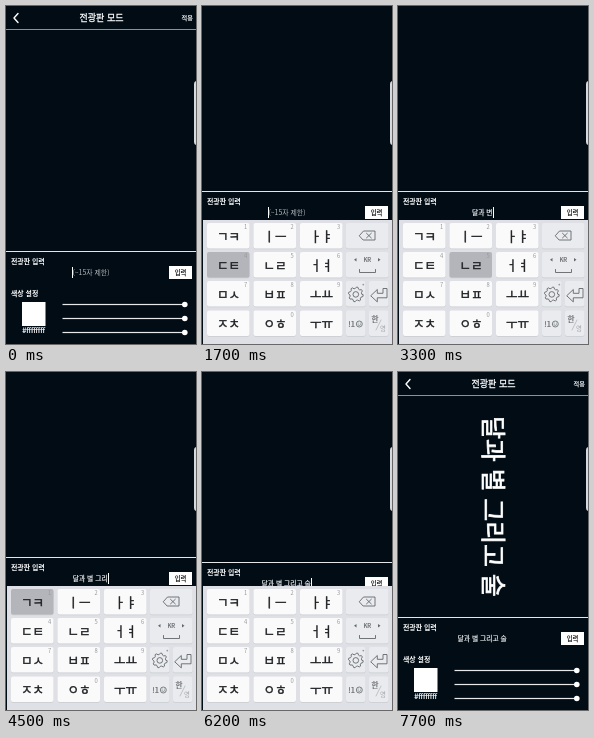
These frames come from a looping animation (190x338 px, 8 s). An HTML page:

```html
<!DOCTYPE html>
<html lang="ko">
<head>
<meta charset="utf-8">
<title>전광판 모드</title>
<style>
  html, body { margin: 0; width: 100%; height: 100%; overflow: hidden; background: #010c15; }
  svg { display: block; width: 100vw; height: 100vh; }
  text { font-family: 'Noto Sans CJK KR', 'Noto Sans CJK', 'Noto Sans CJK JP', sans-serif; white-space: pre; }
</style>
</head>
<body>
<svg id="stage" viewBox="0 0 190 338"></svg>
<script>
const NS = 'http://www.w3.org/2000/svg';
const stage = document.getElementById('stage');
const LOOP = 8000, STEP = 100, PAN = 60, SLIDE = 50, MID = 84.2;
const SPACE = 13;

function add(parent, tag, attrs = {}) {
  const node = document.createElementNS(NS, tag);
  for (const name in attrs) node.setAttribute(name, attrs[name]);
  parent.appendChild(node);
  return node;
}

// Weight 500 is the regular face thickened by a thin outline
function label(parent, str, x, y, size, fill = '#fff', weight = 500, anchor = 'middle') {
  const node = add(parent, 'text', {
    x, y, 'font-size': size, fill, 'text-anchor': anchor,
    'font-weight': weight === 500 ? 400 : weight
  });
  if (weight === 500) {
    node.setAttribute('stroke', fill);
    node.setAttribute('stroke-width', size * 0.03);
  }
  node.textContent = str;
  return node;
}

function box(parent, x, y, width, height, fill, rx = 0) {
  return add(parent, 'rect', { x, y, width, height, fill, rx });
}

function stroke(parent, d, color, width) {
  return add(parent, 'path', {
    d, fill: 'none', stroke: color, 'stroke-width': width,
    'stroke-linecap': 'round', 'stroke-linejoin': 'round'
  });
}

function ring(parent, cx, cy, r, color, width) {
  return add(parent, 'circle', { cx, cy, r, fill: 'none', stroke: color, 'stroke-width': width });
}

// App screen
box(stage, 0, 0, 190, 338, '#010c15');
const app = add(stage, 'g');
stroke(app, 'M12 7.5L8 12L12 16.5', '#fff', 1.4);
label(app, '전광판 모드', 95.5, 15.2, 9);
label(app, '적용', 181.3, 14.2, 6.2);
box(app, 0, 23, 190, 1, '#8b9196');
const board = label(app, '달과 별 그리고 술', 0, 0, 24.8);
board.setAttribute('transform', 'translate(85.5 134.5) rotate(90)');

box(app, 0, 245, 190, 1, '#e4e6e8');
label(app, '전광판 입력', 5, 257.6, 6.9, '#fff', 700, 'start');
const hint = label(app, '(~15자 제한)', 85, 269.4, 6.9, '#b2b6b9', 400);
const input = label(app, '', MID, 269.4, 6.75, '#f2f2f2');
const cursor = box(app, 66, 261, 1, 11, '#fff');
box(app, 163, 260, 23, 13, '#fff');
label(app, '입력', 174.5, 268.8, 6.3, '#111');

label(app, '색상 설정', 5, 290.4, 6.9, '#fff', 700, 'start');
box(app, 16, 296, 23.5, 24, '#fff');
label(app, '#ffffffff', 27.6, 327, 7.3);
for (const y of [298.5, 312.5, 326.5]) {
  box(app, 56.5, y - 0.6, 122, 1.2, '#e6e8e9');
  add(app, 'circle', { cx: 178.8, cy: y, r: 2.8, fill: '#fff' });
}

// Keyboard
const pad = add(stage, 'g');
box(pad, 1, 214, 189, 190, '#dfe0e5');
const keys = [];
const COLS = [5, 51.5, 98], ROWS = [217, 246, 275, 304.5];
const INK = '#1e2023', SOFT = '#63676b', FAINT = '#96999d';

function addKey(x, y, w, fill) {
  box(pad, x, y + 0.8, w, 25.5, '#c9ccd0', 2);
  keys.push({ rect: box(pad, x, y, w, 25.5, fill, 2), fill });
}

['ㄱㅋ', 'ㅣㅡ', 'ㅏㅑ', 'ㄷㅌ', 'ㄴㄹ', 'ㅓㅕ', 'ㅁㅅ', 'ㅂㅍ', 'ㅗㅛ', 'ㅈㅊ', 'ㅇㅎ', 'ㅜㅠ'].forEach((jamo, i) => {
  const x = COLS[i % 3], y = ROWS[Math.floor(i / 3)];
  addKey(x, y, 42.5, '#fafafb');
  label(pad, jamo, x + 21.6, y + 17.6, 12.6, INK);
  const digit = i < 9 ? i + 1 : i === 10 ? 0 : '';
  label(pad, digit, x + 38.5, y + 6.3, 5.8, FAINT, 400);
});

addKey(144, ROWS[0], 42.5, '#e9ebee');
addKey(144, ROWS[1], 42.5, '#e9ebee');
for (const y of [ROWS[2], ROWS[3]]) {
  addKey(144, y, 19.5, '#e9ebee');
  addKey(167, y, 19.5, '#e9ebee');
}

stroke(pad, 'M157.5 229.5L161.5 225H173V234H161.5ZM164.5 227.3L169.3 231.9M169.3 227.3L164.5 231.9', SOFT, 0.9);
label(pad, 'KR', 165.3, 256, 6, SOFT);
add(pad, 'path', { d: 'M154.5 252V255.6L152 253.8ZM176 252V255.6L178.5 253.8Z', fill: SOFT });
stroke(pad, 'M157.5 263.5V266.5H173.5V263.5', SOFT, 0.9);

// Gear outline: radius alternates between tooth and gap
let gear = '';
for (let i = 0; i < 32; i++) {
  const a = (i + 0.5) * Math.PI / 16, r = i % 4 < 2 ? 7.4 : 5.9;
  gear += `${i ? 'L' : 'M'}${(153.8 + r * Math.cos(a)).toFixed(2)} ${(288.4 + r * Math.sin(a)).toFixed(2)}`;
}
stroke(pad, gear + 'Z', SOFT, 0.9);
ring(pad, 153.8, 288.4, 2.8, SOFT, 0.9);
add(pad, 'circle', { cx: 161.3, cy: 278.6, r: 0.9, fill: FAINT });
stroke(pad, 'M169 289.5L175.3 283.5V287.3H181V282.5H185V291.8H175.3V295.5Z', SOFT, 0.9);

label(pad, '!1', 149.6, 320.6, 7.5, SOFT);
ring(pad, 157.3, 318, 3, SOFT, 0.8);
stroke(pad, 'M155.9 318.8Q157.3 320.5 158.7 318.8M156.2 317V317.1M158.4 317V317.1', SOFT, 0.7);
label(pad, '한', 172.9, 316.2, 7.5, SOFT);
label(pad, '영', 181, 325.4, 6.4, '#a1a4a8', 400);
stroke(pad, 'M179 314L174 324', '#a1a4a8', 0.6);

// Edge handle
add(stage, 'path', { d: 'M190 75Q188 75.5 188 78V136Q188 138.5 190 139Z', fill: '#d6dadd' });

// Bursts of presses: start, text before, key indexes, what each press leaves after that text
const bursts = [
  [1700, '', [3, 2, 4, 4, 0, 8, 2], 'ㄷ|다|단|달|닭|달고|달과'],
  [2600, '달과', [SPACE, SPACE], '| '],
  [2900, '달과 ', [7, 5, 5, 4, 4], 'ㅂ|버|벼|변|별'],
  [3500, '달과 별', [SPACE, SPACE], '| '],
  [3800, '달과 별 ', [0, 1, 1, 4, 4, 1], 'ㄱ|기|그|근|글|그리'],
  [4500, '달과 별 ', [0, 8], '그릭|그리고'],
  [4800, '달과 별 그리고', [SPACE, SPACE], '| '],
  [5100, '달과 별 그리고 ', [6, 6, 11, 4, 4], 'ㅁ|ㅅ|수|순|술']
];
const presses = bursts.flatMap(([start, head, ids, tails]) =>
  tails.split('|').map((tail, i) => ({ at: start + i * STEP, key: ids[i], text: head + tail })));

const span = (t, from, to) => Math.min(1, Math.max(0, (t - from) / (to - from)));
const show = (node, on) => node.setAttribute('visibility', on ? 'visible' : 'hidden');
const shift = (node, y) => node.setAttribute('transform', `translate(0 ${Math.round(y)})`);

function cursorOn(t) {
  if (t < 1700) return t < 200 || (t >= 700 && t < 1200);
  return t < 6700 || (t >= 7200 && t < 7700);
}

function draw(t) {
  const opened = 1 - (1 - span(t, 700, 1000)) ** 2.5;
  const closed = span(t, 6000, 6400) ** 3.6;
  shift(app, PAN * (closed - opened));
  shift(pad, SLIDE * (1 - opened));
  pad.setAttribute('opacity', opened * (1 - span(closed, 0.1, 0.6)));

  let text = '', down = -1;
  for (const p of presses) {
    if (t >= p.at + STEP) text = p.text;
    else if (t >= p.at) down = p.key;
  }
  keys.forEach((k, i) => k.rect.setAttribute('fill', i === down ? '#b3b5ba' : k.fill));

  if (input.textContent !== text) input.textContent = text;
  show(hint, !text);
  const x = text ? MID + input.getComputedTextLength() / 2 + 0.2 : 65.8;
  cursor.setAttribute('x', Math.round(x));
  show(cursor, cursorOn(t));
  show(board, t >= 6900);
}

const begin = performance.now();
function tick() {
  const t = (performance.now() - begin) % LOOP;
  draw(Math.floor(t / STEP) * STEP);
  requestAnimationFrame(tick);
}
tick();
</script>
</body>
</html>
```
